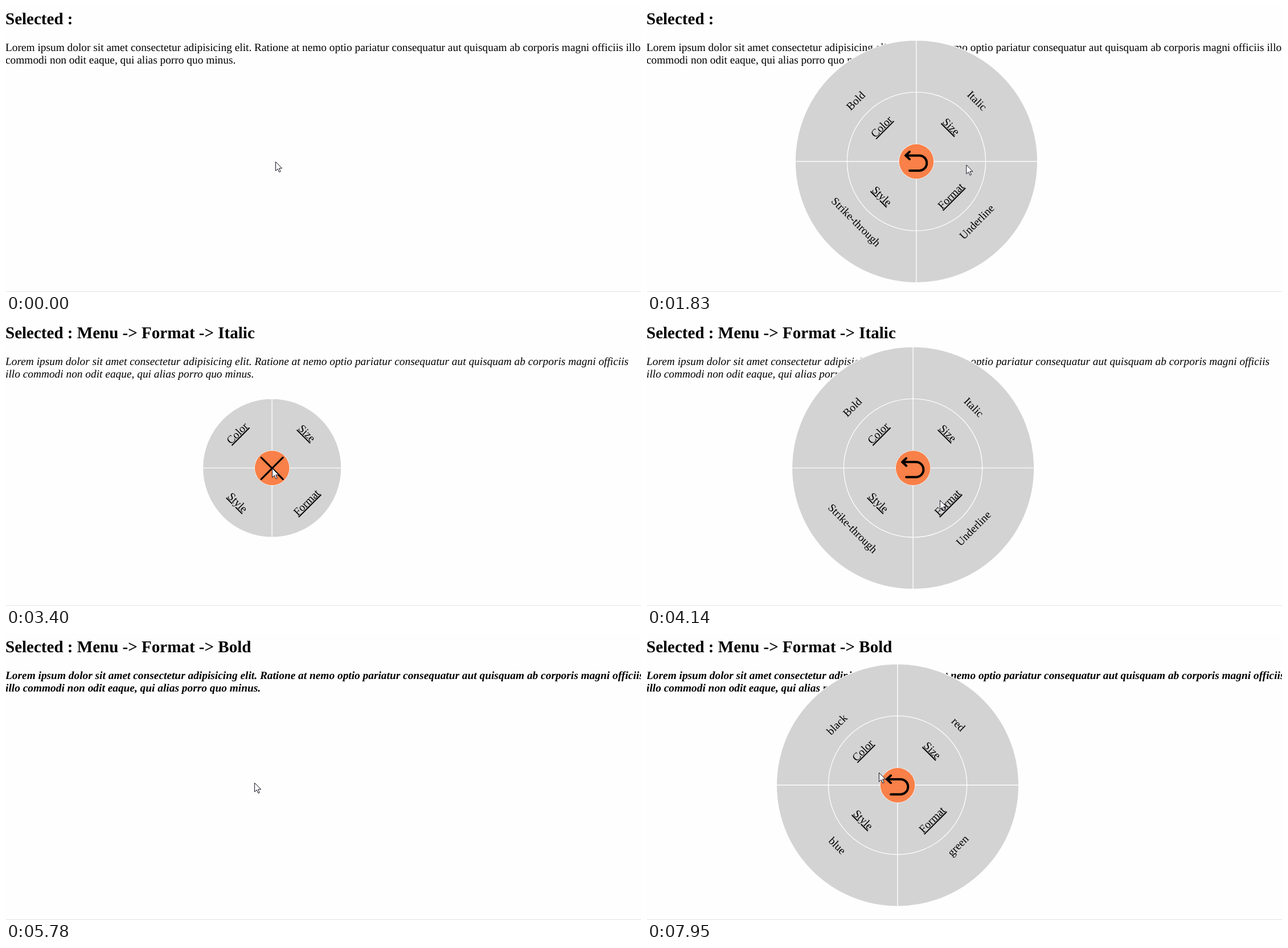
Animation, 1115 px wide and 502 px high, one loop 8000 ms. Source, as an HTML page:

```html
<!DOCTYPE html>
<html lang="en">
<head>
<meta charset="utf-8">
<title>Radial menu</title>
<style>
  html, body { margin: 0; width: 100%; height: 100%; overflow: hidden; background: #fefefe; }
  svg { display: block; width: 1115px; height: 502px; }
  text { font: 19.36px "Liberation Serif", "Times New Roman", serif; fill: #000; text-rendering: geometricPrecision; }
  #title { font-size: 29.04px; font-weight: bold; }
  .italic text { font-style: italic; }
  .bold text { font-weight: bold; }
  .slice { fill: #d3d3d3; stroke: #fefefe; stroke-width: 1.1; }
  .slice.hover { fill: #b0d8e6; }
  .label { text-anchor: middle; }
  .inner .label { text-decoration: underline; }
  .icon { fill: none; stroke: #000; stroke-linecap: round; stroke-linejoin: round; }
</style>
</head>
<body>
<svg viewBox="0 0 1115 502">
  <path d="M0 501.5H1115" stroke="#e2e2e2"/>
  <text id="title" x="-1" y="32"></text>
  <g id="para">
    <text id="line1" x="-1" y="79"></text>
    <text id="line2" x="-1" y="101"></text>
  </g>
  <g id="menu">
    <g id="rings"></g>
    <circle r="30.3" fill="#f98048"/>
    <path id="cross" class="icon" stroke-width="3.1" d="M-19-18.5L19 19.5M19-18.5L-19 19.5"/>
    <path id="back" class="icon" stroke-width="4" d="M-12-17L-19-10.5L-12-4M-18-10.5H5a13 13 0 0 1 0 26.5H-12"/>
  </g>
  <g id="cursor">
    <path id="arrow" d="M.5 .5V16.3L4.2 12.9L6.8 18.6L9.2 17.5L6.6 11.9H11.6Z" fill="#fff" stroke="#101020"/>
    <path id="beam" d="M-1.5-8h2.4l.6 .6l.6-.6h2.4M1.5-7.4V5.4M-1.5 6h2.4l.6-.6l.6 .6h2.4" fill="none" stroke="#333"/>
    <circle id="glow" r="14" fill="#fff000" fill-opacity=".5"/>
  </g>
</svg>
<script>
const LOOP = 8000;
const HUB = 30.3, INNER = 121.6, OUTER = 212.6;
const QUADS = [[-1, -1], [1, -1], [-1, 1], [1, 1]];
const $ = id => document.getElementById(id);

const START = 'Lorem ipsum dolor sit amet consectetur adipisicing elit. Ratione at nemo optio ' +
  'pariatur consequatur aut quisquam ab corporis magni officiis';
const END = 'commodi non odit eaque, qui alias porro quo minus.';

// [from, to, steps, x, y]
const moves = [
  [740, 1080, 6, 532, 328],
  [1620, 2080, 7, 604, 202],
  [2630, 2910, 5, 467, 260],
  [3660, 4010, 6, 514, 316],
  [4470, 4890, 7, 352, 173],
  [5430, 5850, 7, 441, 266],
  [7120, 7620, 8, 407, 243]
];
const clicks = [[200, 410], [1160, 1220], [2160, 2230], [3190, 3400], [4070, 4140],
  [5090, 5160], [6580, 6720], [7820, 7950]];
const menus = [
  { open: 340, sub: 1220, close: 2230, x: 473, y: 272.9, ring: 'format' },
  { open: 3330, sub: 4140, close: 5160, x: 467.2, y: 259.8, ring: 'format' },
  { open: 6650, sub: 7950, close: LOOP, x: 440.1, y: 265.4, ring: 'color' }
];

function add(parent, tag, attrs) {
  const el = document.createElementNS('http://www.w3.org/2000/svg', tag);
  for (const key in attrs) el.setAttribute(key, attrs[key]);
  return parent.appendChild(el);
}

function makeRing(cls, r0, r1, names) {
  const group = add($('rings'), 'g', { class: cls });
  const slices = QUADS.map(([sx, sy]) => {
    const sweep = sx * sy > 0 ? 1 : 0;
    return add(group, 'path', {
      class: 'slice',
      d: `M${sx * r0} 0H${sx * r1}A${r1} ${r1} 0 0 ${sweep} 0 ${sy * r1}` +
         `V${sy * r0}A${r0} ${r0} 0 0 ${1 - sweep} ${sx * r0} 0Z`
    });
  });
  const labels = QUADS.map(([sx, sy], i) => {
    const x = sx * r1 / 2, y = sy * r1 / 2, tilt = sx === sy ? -1 : 1;
    const el = add(group, 'text', {
      class: 'label', y: 6,
      transform: `translate(${x} ${y}) rotate(${45 * tilt})`
    });
    el.textContent = names[i];
    return { x, y, tilt, half: el.getComputedTextLength() / 2 };
  });
  return { group, slices, labels, r0, r1 };
}

const rings = {
  format: makeRing('outer', INNER, OUTER, ['Bold', 'Italic', 'Strike-through', 'Underline']),
  color: makeRing('outer', INNER, OUTER, ['black', 'red', 'blue', 'green']),
  inner: makeRing('inner', HUB, INNER, ['Color', 'Size', 'Style', 'Format'])
};

const show = (el, on) => el.setAttribute('display', on ? 'inline' : 'none');
const place = (el, x, y) => el.setAttribute('transform', `translate(${x} ${y})`);

function cursorAt(t) {
  let x = 473, y = 273;
  for (const [from, to, steps, tx, ty] of moves) {
    if (t < from) break;
    const k = Math.min(steps, Math.floor((t - from) / (to - from) * (steps - 1) + 1e-6) + 1) / steps;
    const e = k * k * (3 - 2 * k);
    x += (tx - x) * e;
    y += (ty - y) * e;
  }
  return [x, y];
}

function onLabel(label, x, y) {
  const dx = x - label.x, dy = y - label.y;
  const along = (dx + label.tilt * dy) * Math.SQRT1_2;
  const across = (dy - label.tilt * dx) * Math.SQRT1_2;
  return Math.abs(along) < label.half && Math.abs(across) < 11;
}

function drawPage(t) {
  const italic = t >= 2230, bold = t >= 5160;
  $('title').textContent = 'Selected :' + (italic ? ' Menu -> Format -> ' + (bold ? 'Bold' : 'Italic') : '');
  $('para').setAttribute('class', (italic ? 'italic' : '') + (bold ? ' bold' : ''));
  $('line1').textContent = START + (italic ? '' : ' illo');
  $('line2').textContent = (italic ? 'illo ' : '') + END;
}

// Returns true when the pointer rests on a label.
function drawMenu(t, px, py) {
  const menu = menus.find(m => t >= m.open && t < m.close);
  show($('menu'), menu);
  if (!menu) return false;
  place($('menu'), menu.x, menu.y);
  const x = px - menu.x, y = py - menu.y, dist = Math.hypot(x, y);
  const expanded = t >= menu.sub;
  const active = expanded ? menu.ring : 'inner';
  const quad = (x > 0 ? 1 : 0) + (y > 0 ? 2 : 0);
  let text = false;
  for (const name in rings) {
    const ring = rings[name];
    const visible = name === 'inner' || name === active;
    show(ring.group, visible);
    const inside = dist > ring.r0 && dist < ring.r1;
    ring.slices.forEach((s, i) => s.classList.toggle('hover', name === active && inside && i === quad));
    if (visible && ring.labels.some(l => onLabel(l, x, y))) text = true;
  }
  show($('cross'), !expanded);
  show($('back'), expanded);
  return text;
}

function frame() {
  const t = performance.now() % LOOP;
  const [x, y] = cursorAt(t);
  drawPage(t);
  const text = drawMenu(t, x, y);
  place($('cursor'), x, y);
  show($('arrow'), !text);
  show($('beam'), text);
  show($('glow'), clicks.some(([a, b]) => t >= a && t < b));
  requestAnimationFrame(frame);
}
frame();
</script>
</body>
</html>
```
